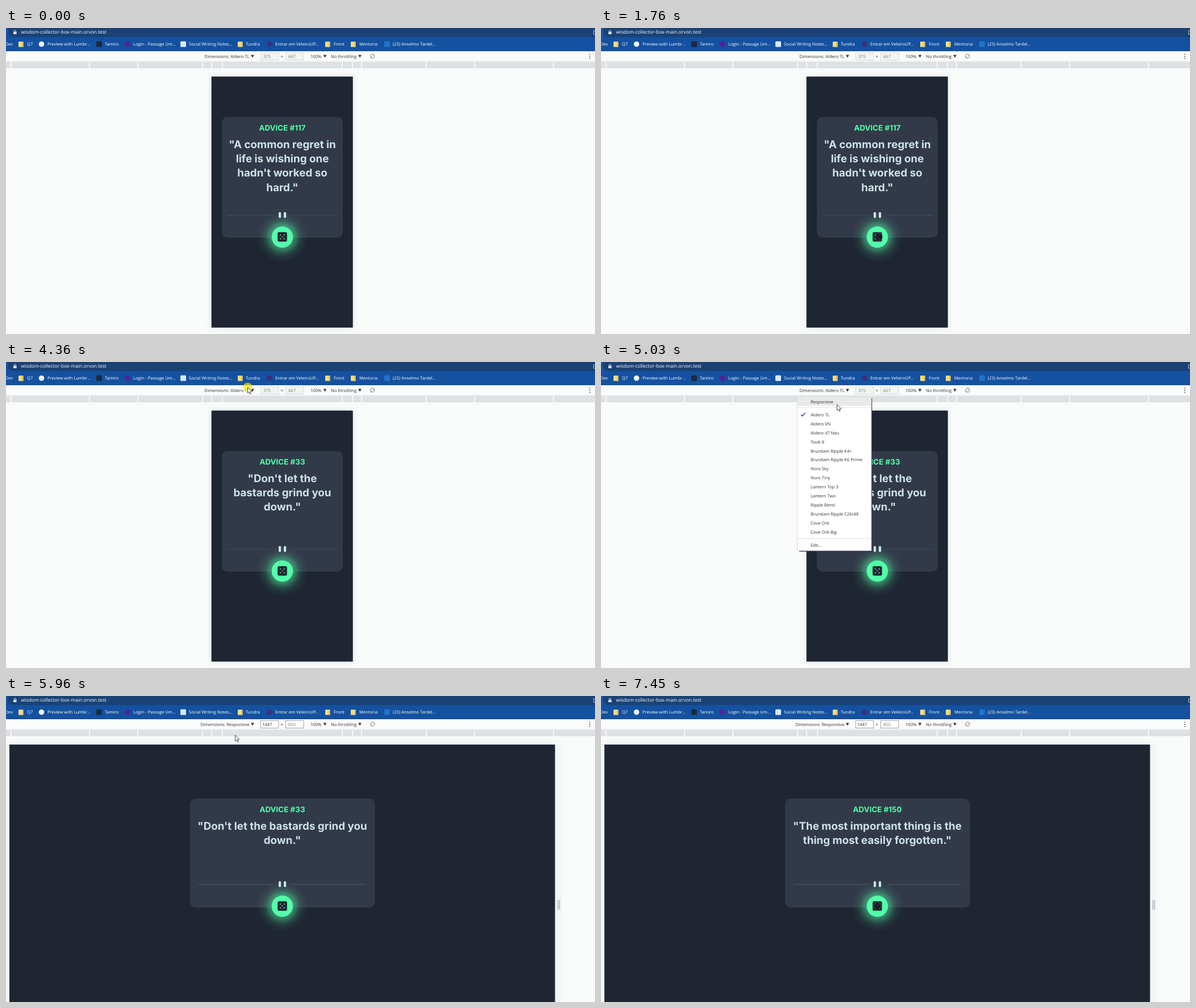
Write an HTML page that moves like this. It is 1037 by 540 pixels and loops after 8 s.

```html
<!DOCTYPE html>
<html lang="en">
<head>
<meta charset="utf-8">
<title>Advice generator</title>
<style>
  html, body { margin: 0; width: 100%; height: 100%; overflow: hidden; background: #f8fbfa; }
  svg { display: block; width: 100%; height: 100%; }
  text { font: 7.6px "Open Sans", "Noto Sans", sans-serif; fill: #333; text-rendering: geometricPrecision; white-space: pre; }
  .url { font-size: 8.5px; fill: #fff; }
  .mark { fill: #fff; }
  .dim { fill: #777; }
  .title { font: 700 13.4px Inter, sans-serif; fill: #53ffaa; text-anchor: middle; }
  .quote { font: 700 18.8px Inter, sans-serif; fill: #cee3e9; text-anchor: middle; }
  .sheet { filter: drop-shadow(0 0 6px rgba(40, 60, 60, .12)); }
</style>
</head>
<body>
<svg id="stage" viewBox="0 0 1037 540" preserveAspectRatio="none"></svg>
<script>
const LOOP = 8000;
const MID = 486.5;

const rect = (x, y, w, h, fill, extra = '') =>
  `<rect x="${x}" y="${y}" width="${w}" height="${h}" fill="${fill}" ${extra}/>`;
const circle = (x, y, r, fill, extra = '') =>
  `<circle cx="${x}" cy="${y}" r="${r}" fill="${fill}" ${extra}/>`;
const text = (x, y, str, cls = '', extra = '') =>
  `<text x="${x}" y="${y}" class="${cls}" ${extra}>${str}</text>`;
const path = (d, stroke, width = 1, fill = 'none') =>
  `<path d="${d}" stroke="${stroke}" stroke-width="${width}" fill="${fill}"/>`;
const during = (from, to, body) => `<g data-from="${from}" data-to="${to}">${body}</g>`;
const arrowDown = x => path(`M${x - 2.8} 47.6h5.6l-2.8 4.8z`, 'none', 0, '#333');

// ---- browser frame ----
const folder = x => rect(x, 24, 8.5, 9.5, '#f8dc7c', 'rx="1"') + rect(x + 6, 25, 2.5, 8.5, '#e8c25a', 'rx=".6"');
const dot = (x, fill) => circle(x + 5, 28.5, 4.8, fill);
const square = (x, fill) => rect(x, 23.5, 10, 10, fill, 'rx="1.5"');

function browser() {
  const labels = [
    [-1.5, 'Dev'], [37, 'Q7'], [73, 'Preview with Lumbr...'], [174, 'Tamiro'],
    [224, 'Login - Passage Um...'], [322, 'Social Writing Notes...'], [422, 'Tundra'],
    [474, 'Entrar em VeleiroUP...'], [577, 'Front'], [622, 'Mentoria'], [681, '(23) Anselmo Tardel...']
  ];
  const gaps = [9, 147, 232, 346, 362, 381, 592, 610, 626, 740, 825, 964];
  return rect(0, 0, 1037, 41, '#1451a0')
    + rect(4, -14, 1050, 30, '#1a4275', 'rx="9"')
    + rect(13, 6.5, 5.6, 4.6, '#d5dfeb', 'rx=".6"') + path('M14.2 7V5.4a1.6 1.6 0 0 1 3.2 0V7', '#d5dfeb', .9)
    + text(26.5, 10.4, 'wisdom-collector-box-main.orvon.test', 'url')
    + path('M1037 5h-2.5v6h2.5', '#c5d2e2', .9)
    + [22, 408, 562, 607].map(folder).join('')
    + dot(57.5, '#eef3f8') + square(159, '#1c2a3d') + dot(209, '#541f97')
    + square(307, '#d9e8f6') + dot(459, '#3c2f78') + square(666, '#1f74c8')
    + labels.map(([x, s]) => text(x, 31.2, s, 'mark')).join('')
    + rect(0, 41, 1037, 18, '#fafcfb') + rect(0, 58.5, 1037, 1, '#dfe2e4')
    + rect(0, 60, 1037, 11, '#dee0e4')
    + gaps.map(x => rect(x - .8, 60, 1.6, 11, '#fbfdfc')).join('')
    + [434, 561.5, 623].map(arrowDown).join('')
    + text(483.6, 53.2, '×') + text(536, 52.8, '100%') + text(572, 52.8, 'No throttling')
    + `<g transform="rotate(-45 645.3 49.8)">${rect(643.1, 46.3, 4.4, 7, 'none', 'rx=".8" stroke="#555" stroke-width=".8"')}</g>`
    + path('M641.4 50.5a4 4 0 0 0 3 3.6M649.2 49.2a4 4 0 0 0-3-3.6', '#666', .7)
    + [46.3, 50, 53.7].map(y => circle(1027.8, y, .9, '#444')).join('');
}

function sizeFields(device, w, h, active) {
  const field = x => rect(x + .5, 43.5, 31.5, 13, active ? '#fff' : '#f3f5f5', `stroke="${active ? '#8a8d91' : '#cfd2d4'}" stroke-width=".8"`);
  return text(428.5, 52.8, 'Dimensions: ' + device, '', 'text-anchor="end"')
    + field(448) + field(492)
    + text(active ? 451 : 453, 52.8, w, active ? '' : 'dim') + text(497, 52.8, h, 'dim');
}

// ---- the page inside the viewport ----
const PHONE = { x: 361.7, w: 249, h: 443, cardX: 380, cardY: 157, cardW: 213, cardH: 213, rule: 330, line: 80, ruleColor: '#465169' };
const WIDE = { x: 6, w: 960.6, h: 470, cardX: 324, cardY: 181, cardW: 325.5, cardH: 192.5, rule: 332, line: 130, ruleColor: '#506069' };

function page(box, number, lines) {
  const { x, w, h, cardX, cardY, cardW, cardH, rule, line, ruleColor } = box;
  const y = rule + 39;
  const pips = [[-3.3, -3.3], [3.3, -3.3], [0, 0], [-3.3, 3.3], [3.3, 3.3]];
  return rect(x, 85.7, w, h, '#1f2632', 'class="sheet"')
    + rect(cardX, cardY, cardW, cardH, '#323a49', 'rx="10"')
    + text(MID, cardY + 24.4, 'ADVICE #' + number, 'title')
    + lines.map((s, i) => text(MID, cardY + 54.6 + i * 25.4, s, 'quote')).join('')
    + path(`M${469 - line} ${rule + .3}h${line}M504 ${rule + .3}h${line}`, ruleColor, .9)
    + rect(480, rule - 5.3, 4.2, 10.6, '#cee3e9', 'rx="2"') + rect(489, rule - 5.3, 4.2, 10.6, '#cee3e9', 'rx="2"')
    + circle(MID, y, 45, 'url(#glow)')
    + circle(MID, y, 27.8, '#53ffaa', 'opacity=".06"')
    + circle(MID, y, 18.7, '#53ffaa')
    + rect(MID - 8.3, y - 8.7, 16.6, 16.6, '#202733', 'rx="2.6"')
    + pips.map(([dx, dy]) => circle(MID + dx, y - .4 + dy, 1, '#7de8b8')).join('');
}

const handle = rect(967.5, 86, 11.5, 454, '#f3f6f5') + path('M971.7 360v17M974.7 360v17', '#8b8f92', 1);

// ---- device menu ----
const DEVICE = 'Aldero TL';
const devices = [
  DEVICE, 'Aldero VN', 'Aldero 47 Neo', 'Tovik 8', 'Brundam Ripple K4+', 'Brundam Ripple K6 Prime',
  'Noro Sky', 'Noro Tiny', 'Lantern Top 3', 'Lantern Two', 'Ripple Bend', 'Brundam Ripple C26/48',
  'Cove Orb', 'Cove Orb Big'
];
const menu = rect(349, 64, 128.3, 270.5, '#2f2850')
  + rect(345.3, 61.3, 130.7, 271.7, '#fff', 'stroke="#cfd0d2" stroke-width=".7"')
  + during(4960, 5960, rect(346, 62, 129.7, 15.5, '#e8e9e9'))
  + path('M346 80.5h129M346 311.5h129', '#dcdcdc', .9)
  + text(369, 72.6, 'Responsive')
  + devices.map((s, i) => text(369, 95.7 + i * 15.95, s)).join('')
  + text(369, 326, 'Edit...')
  + path('M352.2 93l2.4 2.5 5-5.8', '#35247f', 1.3);

// ---- pointer: [time, x, y, look] ----
const steps = [
  [0, 0, 0, ''],
  [700, 936, 520, 'arrow'], [750, 800, 472, 'arrow'], [810, 626, 411, 'arrow'], [870, 0, 0, ''],
  [1010, 518, 393, 'touch'], [1080, 496, 380, 'touch'], [1150, 474, 370, 'touch'],
  [1360, 482, 369, 'touch'], [1430, 489, 368.5, 'touch'], [1620, 489, 368.5, 'touch press'], [1760, 489, 368.5, 'touch'],
  [3410, 484, 270.5, 'touch'], [3480, 478, 212, 'touch'], [3560, 466, 158, 'touch'], [3640, 452, 112, 'touch'],
  [3720, 440, 79, 'arrow'], [3800, 431, 60, 'arrow'], [3880, 427, 49, 'arrow'], [3960, 425.5, 44.5, 'arrow'],
  [4360, 425.5, 44.5, 'arrow press'], [4560, 425.5, 44.5, 'arrow'],
  [4890, 424, 50, 'arrow'], [4960, 420, 63, 'arrow'], [5030, 415.5, 75, 'arrow'], [5110, 415, 79, 'arrow'], [5180, 414.5, 80, 'arrow'],
  [5490, 412, 77, 'arrow'], [5570, 407, 72, 'arrow'], [5650, 403.5, 69.5, 'arrow'],
  [5830, 403.5, 69.5, 'arrow press'], [5960, 403.5, 69, 'arrow'],
  [6290, 413, 65, 'arrow'], [6370, 440, 64, 'arrow'], [6450, 474, 82, 'arrow'], [6530, 497, 150, 'touch'],
  [6610, 508, 236, 'touch'], [6690, 506, 305, 'touch'], [6770, 499, 346, 'touch'], [6850, 491, 366, 'touch'],
  [6920, MID, 371, 'touch'], [7120, MID, 371, 'touch press'], [7260, MID, 371, 'touch']
];

const regret = ['"A common regret in', 'life is wishing one', "hadn't worked so", 'hard."'];
const grind = ['"Don\'t let the', 'bastards grind you', 'down."'];
const grindWide = ['"Don\'t let the bastards grind you', 'down."'];
const forgotten = ['"The most important thing is the', 'thing most easily forgotten."'];

const stage = document.getElementById('stage');
stage.innerHTML = `<defs><radialGradient id="glow">
    <stop offset=".41" stop-color="#53ffaa" stop-opacity=".46"/>
    <stop offset=".58" stop-color="#53ffaa" stop-opacity=".23"/>
    <stop offset=".78" stop-color="#53ffaa" stop-opacity=".07"/>
    <stop offset="1" stop-color="#53ffaa" stop-opacity="0"/>
  </radialGradient></defs>`
  + rect(0, 0, 1037, 540, '#f8fbfa')
  + during(0, 2520, page(PHONE, 117, regret))
  + during(2520, 5960, page(PHONE, 33, grind))
  + during(5960, 7450, page(WIDE, 33, grindWide))
  + during(7450, LOOP, page(WIDE, 150, forgotten))
  + during(5960, LOOP, handle)
  + browser()
  + during(0, 5960, sizeFields(DEVICE, 375, 667, false))
  + during(5960, LOOP, sizeFields('Responsive', 1447, 850, true))
  + during(4360, LOOP, path('M418.6 41a8 8 0 0 1 13.8 0z', 'none', 0, '#34459a'))
  + during(4560, 5960, menu)
  + `<g id="pointer">
      <g data-look="press">${circle(0, 0, 8, '#f4ea10', 'opacity=".68"')}</g>
      <g data-look="touch">${circle(0, 0, 6.8, '#14161c', 'opacity=".72" stroke="#747982" stroke-width=".7"')}</g>
      <g data-look="arrow">${path('M0 0V10.6L2.4 8.4L4.1 12.2L5.8 11.4L4.2 7.7H7.4Z', '#222', .8, '#fff')}</g>
    </g>`;

const timed = [...stage.querySelectorAll('[data-from]')];
const pointer = document.getElementById('pointer');
const looks = [...pointer.children];
const show = (el, on) => { el.style.display = on ? '' : 'none'; };

function draw(now) {
  const t = now % LOOP;
  for (const el of timed) show(el, t >= +el.dataset.from && t < +el.dataset.to);
  const [, x, y, look] = steps.findLast(step => step[0] <= t);
  pointer.setAttribute('transform', `translate(${x} ${y})`);
  for (const el of looks) show(el, look.includes(el.dataset.look));
}

const start = performance.now();
function tick() {
  draw(performance.now() - start);
  requestAnimationFrame(tick);
}
tick();
</script>
</body>
</html>
```
